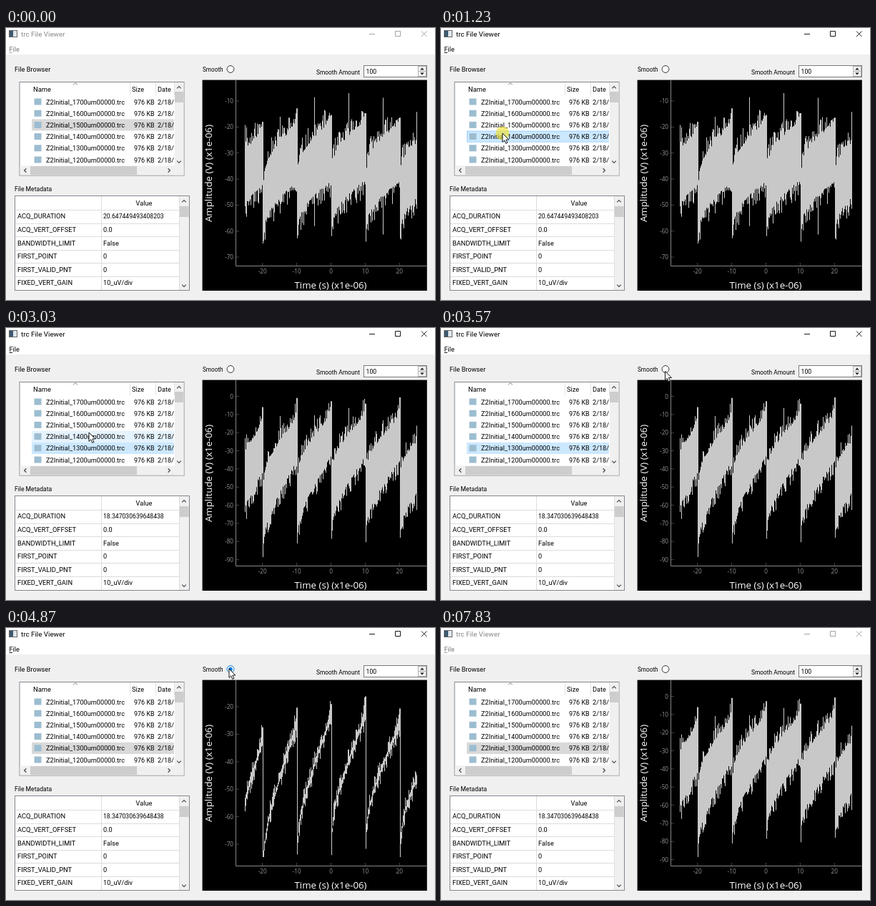
An HTML page that plays this animation: 600x380 px, repeating every 7.9 s.

```html
<!DOCTYPE html>
<html lang="en">
<head>
<meta charset="utf-8">
<title>trc File Viewer</title>
<style>
html, body { margin: 0; width: 100%; height: 100%; overflow: hidden; background: #f0f0f0; }
svg { display: block; width: 100vw; height: 100vh; }
text { font-family: Roboto, "Open Sans", sans-serif; font-size: 9.2px; fill: #000; white-space: pre; }
text.axis { font-family: "Open Sans", "Noto Sans", sans-serif; font-size: 13.3px; fill: #fff; }
text.tick { font-family: "Open Sans", "Noto Sans", sans-serif; font-size: 8.2px; fill: #969696; }
</style>
</head>
<body>
<svg id="stage" viewBox="0 0 600 380"></svg>
<script>
const LOOP = 7900;
const stage = document.getElementById('stage');

function el(name, attrs, parent = stage) {
  const node = document.createElementNS('http://www.w3.org/2000/svg', name);
  for (const key in attrs) node.setAttribute(key, attrs[key]);
  parent.appendChild(node);
  return node;
}
const box = (x, y, width, height, fill, stroke = 'none', parent = stage) =>
  el('rect', { x, y, width, height, fill, stroke }, parent);
const line = (d, stroke, width = 1, parent = stage) =>
  el('path', { d, fill: 'none', stroke, 'stroke-width': width }, parent);
function label(x, y, str, size, parent, attrs = {}) {
  const node = el('text', { x, y, ...attrs }, parent);
  if (size) node.style.fontSize = size + 'px';
  node.textContent = str;
  return node;
}
const show = (node, on) => node.setAttribute('visibility', on ? 'visible' : 'hidden');

// Scroll arrow pointing along dx, dy
function chevron(x, y, dx, dy) {
  const px = dy * 2.8, py = dx * 2.8;
  const bx = x - dx * 1.4, by = y - dy * 1.4;
  line(`M${bx - px} ${by - py}L${x + dx * 1.4} ${y + dy * 1.4}L${bx + px} ${by + py}`, '#505050', 1.3);
}

// Title bar and menu
box(0, 0, 600, 380, '#f0f0f0');
box(0, 0, 600, 37, '#fff');
box(4.5, 3.5, 11, 9, '#dfe7ec', '#666');
box(5, 4, 5, 8, '#3d5a70');
const title = label(21, 11.7, 'trc File Viewer', 9.8);
const menu = label(4.5, 33, 'File', 9.2);
const controls = line('M508 8.5H516M544.5 4.5H551.5V11.5H544.5ZM581 4.5L588.5 12M588.5 4.5L581 12M4.5 34.5H9', '#000', 0.9);

// File browser
label(12, 61, 'File Browser', 9.2);
box(19, 75.5, 230, 130.5, '#fff', '#828790');
line('M173.5 76V94M209.5 76V94M235.5 76V94', '#e2e2e2');
line('M94 79L97 76.8L100 79', '#777', 0.9);
label(38, 89, 'Name', 9.4);
label(176, 89, 'Size');
label(212, 89, 'Date');

const ROW_Y = 95, PITCH = 16.2;
const clip = el('clipPath', { id: 'list' }, el('defs', {}));
box(20, 94, 215, 98, '#000', 'none', clip);
const list = el('g', { 'clip-path': 'url(#list)' });
const rows = Array.from({ length: 6 }, (_, i) => {
  const y = ROW_Y + i * PITCH;
  const back = box(36.5, y + 0.5, 200, PITCH - 1, '#fff', '#fff', list);
  box(39.5, y + 3.5, 10, 9, '#9cbdd0', 'none', list);
  label(56, y + 11.5, `Z2Initial_${1700 - 100 * i}um00000.trc`, 9.2, list);
  label(179, y + 11.5, '976 KB', 9, list);
  label(212, y + 11.5, '2/18/...', 9.2, list);
  return back;
});
box(236, 76, 12.5, 129.5, '#f0f0f0');
box(19.5, 192.5, 229, 13, '#f0f0f0');
box(236, 89, 12, 15, '#cdcdcd');
box(34, 193, 149, 12, '#cdcdcd');
chevron(242, 83, 0, -1);
chevron(242, 187, 0, 1);
chevron(27, 199, -1, 0);
chevron(228, 199, 1, 0);

// Metadata table
label(12, 228, 'File Metadata', 8.6);
box(12.5, 234.5, 244, 132, '#fff', '#828790');
label(193, 248.3, 'Value', 9.2, stage, { 'text-anchor': 'middle' });
line('M133.5 235V366M242.5 235V366', '#dcdcdc');
const META = { ACQ_DURATION: '', ACQ_VERT_OFFSET: '0.0', BANDWIDTH_LIMIT: 'False',
  FIRST_POINT: '0', FIRST_VALID_PNT: '0', FIXED_VERT_GAIN: '10_uV/div' };
const [duration] = Object.entries(META).map(([key, value], i) => {
  const y = 254 + i * 18.55;
  line(`M13 ${Math.round(y) + 0.5}H242`, '#dcdcdc');
  label(16, y + 12.4, key, 9.3);
  return label(136, y + 12.4, value, i ? 9.2 : 8.65);
});
box(243, 235, 13, 131, '#f0f0f0');
box(243, 249, 12.5, 15, '#cdcdcd');
chevron(249, 242, 0, -1);
chevron(249, 360, 0, 1);

// Smoothing controls
label(275, 61, 'Smooth', 8.2);
const radio = el('circle', { cx: 314, cy: 57.5, r: 4.9 });
const dot = el('circle', { cx: 314, cy: 57.5, r: 2.7, fill: '#0078d7' });
label(434, 64.5, 'Smooth Amount', 8.4);
box(500.5, 52.5, 88, 16, '#fff', '#7a7a7a');
label(503.5, 64, '100', 8.7);
box(576.5, 53.5, 11, 7, '#f0f0f0', '#b4b4b4');
box(576.5, 60.5, 11, 7, '#f0f0f0', '#b4b4b4');
el('path', { d: 'M579.3 58.5L582 55.5L584.7 58.5ZM579.3 62.6L582 65.6L584.7 62.6Z', fill: '#222' });

// Plot frame
box(274.6, 72.6, 314.2, 294.4, '#000');
label(454, 363.5, 'Time (s) (x1e-06)', 0, stage, { class: 'axis', 'text-anchor': 'middle' });
label(0, 0, 'Amplitude (V) (x1e-06)', 0, stage,
  { class: 'axis', 'text-anchor': 'middle', transform: 'translate(287.5 203) rotate(-90)' });
line('M321.5 73V332.5H588.5', '#868686');
for (let v = -20; v <= 20; v += 10) {
  const x = 454.5 + v * 4.79;
  line(`M${x} 332V328`, '#444');
  label(x, 342.5, v, 0, stage, { class: 'tick', 'text-anchor': 'middle' });
}

function random(seed) {
  return () => {
    seed = (seed * 1664525 + 1013904223) % 4294967296;
    return seed / 4294967296;
  };
}

// A noisy sawtooth band: it climbs through each period, drops at the end of it
// and spikes at half-periods. The whole band bows up towards the middle.
function wave({ top, bottom, rise, power, bow, rough, kick, drop, spike, seed }) {
  const rnd = random(seed);
  const burr = () => rough * (rnd() ** 2 - 0.35);
  let d = '', last = 320, lastU = 0;
  for (let x = 334; x <= 574; x++) {
    const phase = (x - 359) / 47.9;
    const u = phase - Math.floor(phase);
    const sag = 0.0025 * (x - 478) ** 2;
    const climb = u ** power;
    const fall = phase < 0 ? 0 : drop * Math.exp(-u * 24);
    let hi = top - rise[0] * climb - kick * u ** 16 + sag * bow[0] + fall - burr();
    let lo = bottom - rise[1] * climb + sag * bow[1] + fall + burr();
    if (x === 334 || (lastU < 0.5 && u >= 0.5) || x === 574) {
      hi -= spike * (0.6 + 0.4 * rnd());
      lo += spike * rnd();
    }
    if (u < lastU) hi = Math.min(hi, last);
    hi = Math.max(hi, 88);
    lo = Math.min(Math.max(lo, hi + 3), 320);
    d += `M${x + 0.5} ${hi.toFixed(1)}V${lo.toFixed(1)}`;
    last = hi;
    lastU = u;
  }
  return d;
}

// One trace with its vertical scale: value `first` lies at y0, then every ten units `step` px lower.
function plot(shape, first, y0, step) {
  const g = el('g', {});
  line(wave(shape), '#c8c8c8', 1.05, g);
  for (let y = y0, v = first; y < 326; y += step, v -= 10) {
    line(`M322 ${y}H326`, '#444', 1, g);
    label(318, y + 3, v, 0, g, { class: 'tick', 'text-anchor': 'end' });
  }
  return g;
}

const flat = { top: 183, bottom: 280, rise: [62, 60], power: 0.6, bow: [0.4, 0.2],
  rough: 24, kick: 12, drop: 22, spike: 48, seed: 11 };
const steep = { top: 180, bottom: 274, rise: [66, 90], power: 0.8, bow: [0.4, 0.6],
  rough: 20, kick: 20, drop: 24, spike: 24, seed: 37 };
const between = { ...steep, bottom: 277, rise: [64, 75], power: 0.7, spike: 36, seed: 23 };
const thin = { top: 264, bottom: 280, rise: [150, 150], power: 0.8, bow: [1, 1],
  rough: 16, kick: 22, drop: 32, spike: 0, seed: 51 };
const plots = {
  flat: plot(flat, -10, 102, 36.35),
  between: plot(between, 0, 79.5, 30.1),
  steep: plot(steep, 0, 95.5, 25.35),
  thin: plot(thin, -20, 110, 38.4)
};

// Pointer
const halo = el('circle', { r: 9.5, fill: '#f0e020', opacity: 0.6 });
const pointer = el('path', {
  d: 'M0 0V12.4L2.8 9.8L4.8 14.4L6.9 13.4L4.9 9H8.9Z',
  fill: '#fff', stroke: '#000', 'stroke-width': 0.9
});

// Pointer stops: start and end of the move, then the place reached.
const STOPS = [
  [130, 610, 82, 147], [760, 830, 86, 147], [1460, 1620, 95, 150], [1870, 1930, 102, 164],
  [3030, 3030, 116, 146], [3110, 3570, 313.5, 60.5], [3645, 3720, 327, 58],
  [3950, 3950, 313, 58], [4260, 4490, 312, 57], [6750, 7520, 575, 386]
];
const TICK = 77;
const ease = u => u * u * (3 - 2 * u);

function pointerAt(t) {
  let x = 250, y = 236;
  if (t < STOPS[0][0]) return [-50, -50];
  for (const [start, end, toX, toY] of STOPS) {
    if (t < start) break;
    const count = Math.round((end - start) / TICK) + 1;
    const step = Math.min(count, Math.floor((t - start) / TICK + 0.1) + 1);
    const u = ease(step / count);
    x += (toX - x) * u;
    y += (toY - y) * u;
  }
  return [x, y];
}

const within = (t, a, b) => t >= a && t < b;
const clicking = t => within(t, 1230, 1310) || within(t, 2560, 2630) ||
  within(t, 4640, 4720) || within(t, 5960, 6110);

function drawRows(t, x, y) {
  const selected = t < 1230 ? 2 : t < 2560 ? 3 : 4;
  const focused = within(t, 1230, 4640);
  const hover = x >= 36 && x < 235 ? Math.floor((y - ROW_Y) / PITCH) : -1;
  rows.forEach((row, i) => {
    let fill = i === hover ? '#e5f3ff' : '#fff', edge = fill;
    if (i === selected) {
      fill = edge = focused ? '#cce8ff' : '#d9d9d9';
      if (focused && i === hover) edge = '#99d1ff';
    }
    row.setAttribute('fill', fill);
    row.setAttribute('stroke', edge);
  });
}

function draw(t) {
  const [x, y] = pointerAt(t);
  pointer.setAttribute('transform', `translate(${x} ${y})`);
  halo.setAttribute('cx', x);
  halo.setAttribute('cy', y);
  show(halo, clicking(t));

  const active = within(t, 1230, 7750);
  title.style.fill = active ? '#000' : '#8a8a8a';
  menu.style.fill = active ? '#000' : '#777';
  controls.setAttribute('stroke', active ? '#000' : '#999');
  drawRows(t, x, y);

  const current = t < 1460 ? 'flat' : t < 2800 ? 'between' : within(t, 4870, 6280) ? 'thin' : 'steep';
  for (const key in plots) show(plots[key], key === current);
  duration.textContent = t < 1460 ? '20.647449493408203' : t < 2800 ? '18.572149276733398' : '18.347030639648438';

  const pressed = within(t, 6280, 6350);
  const over = within(t, 3950, 6827) && !pressed;
  radio.setAttribute('fill', pressed ? '#ccc' : '#fff');
  radio.setAttribute('stroke', over ? '#0078d7' : '#333');
  show(dot, within(t, 4720, 6280));
}

const start = performance.now();
function frame() {
  draw((performance.now() - start) % LOOP);
  requestAnimationFrame(frame);
}
frame();
</script>
</body>
</html>
```
